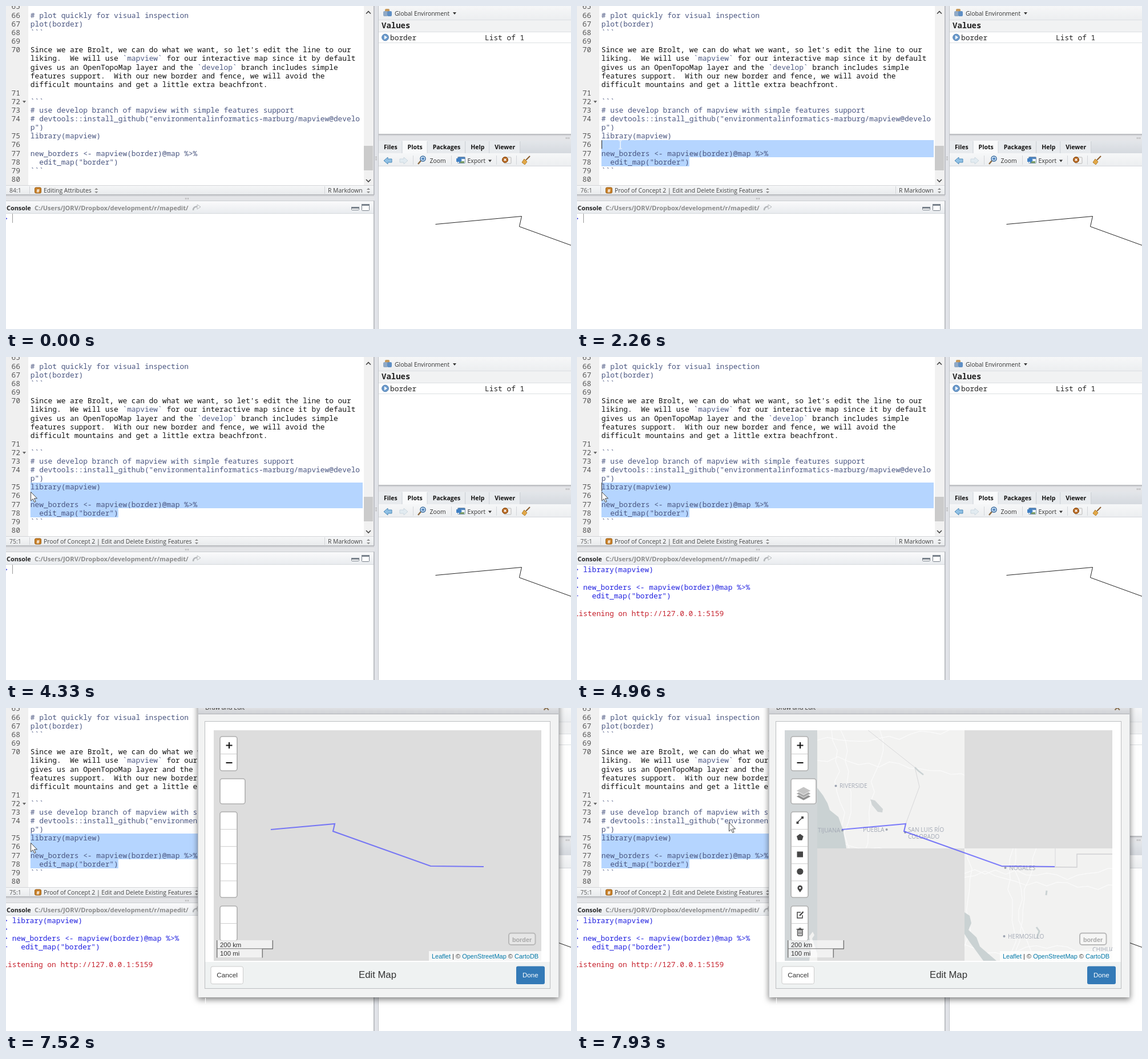
An HTML page with a canvas that plays this animation: 990x566 px, repeating every 8000 ms.

```html
<!DOCTYPE html>
<html lang="en">
<head>
<meta charset="utf-8">
<title>Editing a map from the console</title>
<style>
html, body { margin: 0; width: 100%; height: 100%; overflow: hidden; background: #fff; }
canvas { display: block; width: 990px; height: 566px; }
</style>
</head>
<body>
<canvas id="stage" width="990" height="566"></canvas>
<script>
const c = document.getElementById('stage').getContext('2d');
const LOOP = 8000, ADV = 7.698, LEFT = 42.8, ROW = 15.1;
const MONO = '12.83px "Noto Sans Mono", monospace';
const sans = s => s + 'px "Open Sans", sans-serif';
const arial = s => s + 'px "Liberation Sans", Arial, sans-serif';
const UI = sans(10.4), BOLD = 'bold ' + sans(10.5);
const INK = '#4a5680', GREY = '#555';

// Lines without a number continue the one above.
const CODE = `66|# plot quickly for visual inspection
67|plot(border)
68|\`\`\`
69|
70|Since we are Brolt, we can do what we want, so let's edit the line to our
|liking.  We will use \`mapview\` for our interactive map since it by default
|gives us an OpenTopoMap layer and the \`develop\` branch includes simple
|features support.  With our new border and fence, we will avoid the
|difficult mountains and get a little extra beachfront.
71|
72|\`\`\`
73|# use develop branch of mapview with simple features support
74|# devtools::install_github("environmentalinformatics-marburg/mapview@develo
|p")
75|library(mapview)
76|
77|new_borders <- mapview(border)@map %>%
78|  edit_map("border")
79|\`\`\`
80|`.split('\n').map(s => s.split('|'));
const PROSE_FROM = 4, PROSE_TO = 8, LAST = 17;

const DRAG_START = 2030, DRAG_END = 2780, OPEN = 5120, MAP = 7520, TILES = 7610;
// Pointer key points: time, x, y
const PATH = [
  [0, 1010, 580], [230, 822, 522], [480, 268, 306], [1310, 194, 276], [DRAG_START, 194, 275],
  [2260, 76, 243], [DRAG_END, 46, 234], [3650, 46, 234], [3790, 43, 236], [TILES, 43, 236], [7930, 266, 200]
];

const clamp = (v, a, b) => Math.min(b, Math.max(a, v));
const rowTop = r => 8.7 + ROW * r;

function pointerAt(t) {
  const i = PATH.findLastIndex(p => p[0] <= t);
  const a = PATH[i], b = PATH[i + 1] || a;
  const u = clamp((t - a[0]) / (b[0] - a[0] || 1), 0, 1), k = u * u * (3 - 2 * u);
  return [a[1] + (b[1] - a[1]) * k, a[2] + (b[2] - a[2]) * k];
}
// The selection head follows the pointer while dragging.
function headAt(t) {
  if (t < DRAG_START) return null;
  const [x, y] = pointerAt(Math.min(t, DRAG_END));
  const row = Math.floor((y - rowTop(0)) / ROW);
  return { row, col: clamp(Math.round((x - LEFT) / ADV), 0, CODE[row][1].length) };
}
function seeded(s) {
  return () => (s = (s * 16807) % 2147483647) / 2147483647;
}

function rect(x, y, w, h, fill) { c.fillStyle = fill; c.fillRect(x, y, w, h); }
function grad(x, y, w, h, a, b) {
  const g = c.createLinearGradient(0, y, 0, y + h);
  g.addColorStop(0, a);
  g.addColorStop(1, b);
  rect(x, y, w, h, g);
}
function text(s, x, y, font, color, align = 'left') {
  c.font = font;
  c.fillStyle = color;
  c.textAlign = align;
  c.fillText(s, x, y);
  return c.measureText(s).width;
}
function paint(fill, stroke, w = 1) {
  if (fill) { c.fillStyle = fill; c.fill(); }
  if (stroke) { c.strokeStyle = stroke; c.lineWidth = w; c.stroke(); }
}
function trace(pts) {
  c.beginPath();
  pts.forEach(p => c.lineTo(p[0], p[1]));
}
function poly(pts, fill, stroke, w) { trace(pts); c.closePath(); paint(fill, stroke, w); }
function line(pts, color, w) { trace(pts); paint(null, color, w); }
function box(x, y, w, h, r, fill, stroke, lw) {
  c.beginPath();
  c.roundRect(x, y, w, h, r);
  paint(fill, stroke, lw);
}
function disc(x, y, r, fill, stroke, w) {
  c.beginPath();
  c.arc(x, y, r, 0, 7);
  paint(fill, stroke, w);
}
function cross(x, y, r, color, w) {
  line([[x - r, y - r], [x + r, y + r]], color, w);
  line([[x + r, y - r], [x - r, y + r]], color, w);
}
function tri(x, y, s, h, color) { poly([[x - s, y], [x + s, y], [x, y + h]], color); }
function updown(x) {
  tri(x, 322, 3, -3, '#8a8a8a');
  tri(x, 325, 3, 3, '#8a8a8a');
}
function grip(x, y, across) {
  for (let i = 0; i < 3; i++) {
    if (across) rect(x + i * 2.5, y, 1, 3, '#aaa');
    else rect(x, y + i * 2.5, 3, 1, '#aaa');
  }
}
function clipped(x, y, w, h, draw) {
  c.save();
  c.beginPath();
  c.rect(x, y, w, h);
  c.clip();
  draw();
  c.restore();
}

function selection({ row, col }) {
  for (let r = row; r <= LAST; r++) {
    const x = r === row ? LEFT + col * ADV : LEFT;
    const end = r === LAST ? LEFT + CODE[r][1].length * ADV : 625;
    const y = Math.round(rowTop(r));
    rect(x, y, end - x, Math.round(rowTop(r + 1)) - y, '#b5d5ff');
  }
}

function editor(t) {
  const head = headAt(t);
  rect(0, 0, 39, 314, '#f0f0f0');
  if (head) selection(head);
  text('65', 25, 5, MONO, GREY, 'right');
  CODE.forEach(([num, s], r) => {
    const y = rowTop(r) + 12.2, prose = r >= PROSE_FROM && r <= PROSE_TO;
    text(num, 25, y, MONO, GREY, 'right');
    let x = LEFT;
    for (const part of prose ? s.split(/(`[^`]*`)/) : [s]) {
      text(part, x, y, MONO, prose && part[0] !== '`' ? '#111' : INK);
      x += part.length * ADV;
    }
  });
  tri(32, 166, 3, 4, '#666');
  const blinkOn = t < DRAG_END || Math.floor((t - DRAG_END) / 512) % 2 === 0;
  if (head && blinkOn && t < OPEN) rect(Math.round(LEFT + head.col * ADV), rowTop(head.row), 1, ROW, '#222');

  rect(627, 0, 17, 314, '#f1f1f1');
  rect(627, 245, 16, 43, '#cbcbcb');
  line([[631, 13.5], [635, 9.5], [639, 13.5]], '#444', 1.6);
  line([[631, 304], [635, 308], [639, 304]], '#444', 1.6);

  grad(0, 314, 645, 16, '#f6f7f8', '#e9ebed');
  rect(0, 314, 645, 1, '#d3d5d8');
  for (const x of [41, 558]) rect(x, 316, 1, 13, '#d0d2d5');
  text(head ? CODE[head.row][0] + ':' + (head.col + 1) : '84:1', 6, 327, UI, GREY);
  box(50.5, 318, 11, 10, 2, '#c9822c', '#9c6118');
  text('#', 56, 326.5, 'bold ' + sans(8), '#fff', 'center');
  const title = head ? 'Proof of Concept 2 | Edit and Delete Existing Features' : 'Editing Attributes';
  updown(66 + text(title, 66, 327, UI, '#444') + 8.5);
  text('R Markdown', 564, 327, UI, '#444');
  updown(635);
}

function consolePane(t) {
  rect(0, 330, 652, 11, '#e4e5e8');
  grad(0, 330, 645, 4, '#b0b2b6', '#e4e5e8');
  grip(314, 336, true);
  grad(0, 341, 645, 22, '#fbfbfc', '#e9ecef');
  rect(0, 341, 645, 1, '#c9ccd0');
  rect(0, 363, 645, 1, '#d5d8dc');
  text('Console', 1, 357.5, 'bold ' + sans(10.9), '#222');
  text('C:/Users/JORV/Dropbox/development/r/mapedit/', 50, 357.5, 'bold ' + sans(11), '#8b8b8b');
  c.beginPath();
  c.moveTo(328, 358);
  c.quadraticCurveTo(328, 351.5, 335, 351.5);
  paint(null, '#b4b7ba', 2.5);
  poly([[335, 348], [341, 352], [335, 356]], '#f4f5f6', '#b4b7ba');
  for (const [x, y, h] of [[605, 352, 6], [623, 347, 12]]) {
    box(x + .5, y + .5, 13, h - 1, 1, '#fff', '#77808a');
    rect(x, y, 14, 3, '#77808a');
  }

  const print = (s, row, color = '#2222e0') => text(s, 10.8 - 2 * ADV, 377 + 15.4 * row, MONO, color);
  print(t < 4640 ? '>' : '> library(mapview)', 0);
  if (t < 4640) rect(11, 364, 1, 16, '#999');
  if (t >= 4800) ['>', '> new_borders <- mapview(border)@map %>%', '+   edit_map("border")'].forEach((s, i) => print(s, i + 1));
  if (t >= 4960) print('Listening on http://127.0.0.1:5159', 5, '#c5202c');
}

function arrow(x, y, k, fill, edge) {
  const half = [[-7, 0], [0, -6], [0, -3], [7, -3]];
  const pts = half.concat(half.map(p => [p[0], -p[1]]).reverse());
  poly(pts.map(p => [x + p[0] * k, y + p[1]]), fill, edge);
}

function plotToolbar() {
  grad(653, 258, 337, 22, '#f6f7f8', '#eceef0');
  rect(653, 280, 337, 1, '#d5d8dc');
  arrow(669, 271, 1, '#8fc0e4', '#4a88b8');
  arrow(697, 271, -1, '#e2ebf1', '#ccd8e0');
  for (const x of [713, 780, 859, 894]) rect(x, 262, 1, 16, '#d3d6da');
  line([[727, 271], [722, 277]], '#8a6a42', 2.5);
  disc(730.5, 267.5, 4.5, '#cfe3f5', '#3d6d9f', 1.5);
  rect(728, 267, 5, 1.4, '#2f6cb0');
  rect(730, 265, 1.4, 5, '#2f6cb0');
  text('Zoom', 742.5, 275, UI, '#333');
  box(791.5, 264.5, 13, 11, 1, '#eef4fa', '#7f95ab');
  rect(792, 265, 12, 3, '#4d82bd');
  rect(794, 272, 9, 3, '#7a9c64');
  arrow(794, 270, -.7, '#3f80c4');
  text('Export', 808.5, 275, UI, '#333');
  tri(848, 269.5, 3, 4, '#333');
  box(873, 265, 12, 11, 1, '#f2f2f2', '#b8b8b8');
  disc(874.5, 269.5, 5, '#b5651d', '#8a4a10');
  cross(874.5, 269.5, 2, '#fff', 1.5);
  line([[918, 263], [911, 270]], '#8a5a2b', 2);
  poly([[908, 268], [913, 273], [909, 278], [904, 274]], '#e2a848', '#b47f2a');
}

function rightPanes() {
  rect(645, 0, 8, 566, '#e1e3e8');
  for (const [y, h] of [[0, 331], [341, 225]]) {
    rect(644, y, 1, h, '#b2b5ba');
    rect(645, y, 1, h, '#c6c8cd');
  }
  rect(652, 0, 1, 566, '#c3c6cb');
  grip(647, 264, false);

  grad(653, 0, 337, 24, '#f6f7f8', '#eceef0');
  rect(653, 25, 337, 20, '#f1f2f3');
  for (const y of [24, 45, 64]) rect(653, y, 337, 1, '#dcdfe2');
  box(664, 5, 8, 8, 2, '#c7995a');
  box(661, 9, 8, 9, 2, '#8fa9c6');
  box(668, 9, 8, 9, 2, '#5f8fc4');
  text('Global Environment', 681, 16.8, UI, '#333');
  tri(786, 11, 3, 4, '#333');
  text('Values', 658, 39, 'bold 14px "Noto Sans Mono", monospace', '#222');
  disc(664.5, 55, 5.8, '#6c9bcd', '#4a79ab');
  poly([[663, 51.5], [668, 55], [663, 58.5]], '#fff');
  text('border', 673, 59.5, MONO, '#222');
  text('List of 1', 839, 59.5, MONO, '#222');

  rect(653, 224, 337, 12, '#e4e5e8');
  grad(653, 224, 337, 4, '#b0b2b6', '#e4e5e8');
  grip(981, 230, true);
  grad(653, 236, 337, 22, '#e3e6ea', '#d5d9df');
  let x = 662;
  for (const name of ['Files', 'Plots', 'Packages', 'Help', 'Viewer']) {
    c.font = BOLD;
    const w = c.measureText(name).width;
    rect(x - 9, 236, w + 18, 22, name === 'Plots' ? '#f8f9fa' : '#e8ebee');
    rect(x + w + 8, 237, 1, 21, '#c6cad0');
    text(name, x, 251, BOLD, '#111');
    x += w + 18;
  }
  plotToolbar();
  line([[752.5, 382.5], [903.5, 368.5], [899.5, 386.5], [990.5, 419.5]], '#222');
}

// Gently wandering roads across one tile.
function roads(x, y, w, h, seed) {
  const rnd = seeded(seed);
  for (let i = 0; i < 7; i++) {
    const flat = i % 2, pts = [];
    let off = rnd() * (flat ? h : w);
    for (let d = 0; d <= 270; d += 18) {
      pts.push(flat ? [x + d, y + off] : [x + off, y + d]);
      off += (rnd() - .5) * 18;
    }
    line(pts, '#fbfbfb', 1.2);
  }
}

function tiles(alpha) {
  const land = '#f2f2f1', sea = '#cad2d3', edge = '#d8d8da';
  c.globalAlpha = alpha;
  rect(364, 39, 57, 404, '#d1d6d8');
  poly([[407, 443], [410, 420], [407, 400], [413, 392], [416, 398], [412, 404], [421, 430], [421, 443]], land);

  clipped(421, 39, 258, 207, () => {
    rect(421, 39, 258, 207, land);
    roads(421, 39, 258, 207, 11);
    poly([[421, 140], [431, 153], [439, 167], [443, 179], [458, 191], [466, 213], [472, 246], [421, 246]], sea);
    poly([[514, 160], [522, 162], [536, 177], [535, 183], [527, 182], [517, 170]], '#d0d5d6');
    line([[510, 39], [592, 104], [600, 138], [576, 203], [573, 216], [679, 254]], edge);
    line([[592, 104], [598, 110], [607, 117]], sea, 2.5);
  });
  clipped(679, 246, 259, 197, () => {
    rect(679, 246, 259, 197, land);
    roads(679, 246, 259, 197, 29);
    poly([[679, 358], [688, 364], [691, 377], [686, 389], [700, 402], [706, 418], [735, 443], [712, 443], [688, 410], [679, 396]], sea);
    line([[744, 278], [876, 279], [876, 256], [938, 256]], '#d0d0d3', 1.4);
    line([[838, 246], [838, 279]], edge);
    line([[823, 320], [822, 328]], sea, 3);
    line([[805, 384], [810, 391], [806, 404]], sea, 3);
  });

  // Name, x, baseline, side of the dot
  for (const [name, x, y, side] of [
    ['RIVERSIDE', 460, 140, -1], ['TIJUANA', 422, 218, 1], ['PUEBLA', 501, 216.5, 1], ['SAN LUIS RÍO', 580, 216.5, 0],
    ['COLORADO', 580, 228.5, 0], ['NOGALES', 757, 283.5, -1], ['HERMOSILLO', 755, 403.5, -1], ['CHIHUAHUA', 903, 426.5, 0]
  ]) {
    const w = text(name, x, y, sans(10.2), '#a3a9b5');
    if (side) disc(side < 0 ? x - 6.5 : x + w + 4, y - 3.5, 2, '#9aa1af');
  }
  disc(575, 218, 2, '#9aa1af');
}

function mapIcons() {
  const k = '#464646', x = 390.8;
  ['#8f8f8f', '#a9a9a9', '#c4c4c4'].forEach((fill, i) => {
    const y = 155 - i * 5;
    poly([[384, y], [397, y - 7], [410, y], [397, y + 7]], fill, '#fff', .8);
  });
  line([[386, 200.5], [395, 192]], k, 1.6);
  rect(384.5, 199, 4, 4, k);
  rect(393, 190, 4, 4, k);
  poly([0, 1, 2, 3, 4].map(i => [x + 6.2 * Math.sin(i * 1.2566), 226.7 - 6.2 * Math.cos(i * 1.2566)]), k);
  rect(385.5, 251.5, 10.5, 10, k);
  disc(x, 286.5, 5.6, k);
  tri(x, 317, 4.2, 6, k);
  disc(x, 315.2, 4.4, k);
  disc(x, 315.2, 1.7, '#fff');
  line([[392, 358], [386, 358], [386, 368], [395, 368], [395, 363]], k, 1.5);
  line([[390, 364], [396.5, 357]], k, 2.4);
  box(386.5, 389, 8.5, 10, 1, null, k, 1.4);
  rect(384.5, 387, 12.5, 1.4, k);
  rect(388.5, 385.3, 4.5, 1.4, k);
  for (let i = -1; i < 2; i++) rect(x - .5 + i * 2.1, 391, 1, 6, k);
}

function buttonGroup(y, h, n, w = 32) {
  box(375, y + 1, w - 2, h - 2, 4, '#fff', '#b0b0b0', 1.6);
  for (let i = 1; i < n; i++) rect(376, y + 1 + i * 30.1, w - 4, 1, '#ccc');
}
function scaleBar(label, y, w, closed) {
  rect(369, y, w, 15, 'rgba(255,255,255,.6)');
  const x = 369.7, end = 369 + w - .7;
  line([[x, y], [x, y + 15.5]], '#777', 1.5);
  line([[end, y], [end, y + 15.5]], '#777', 1.5);
  if (closed) line([[x, y + 15], [end, y + 15]], '#777', 1.5);
  text(label, 375, y + 12.2, arial(11.4), '#333');
}

function mapPage(t) {
  rect(364, 39, 574, 404, '#ddd');
  if (t >= TILES) clipped(364, 39, 574, 404, () => tiles(clamp((t - TILES) / 250, 0, 1)));
  line([[464, 213], [576, 203], [573, 216], [744, 277], [837, 278]], 'rgba(70,70,255,.68)', 2.1);

  buttonGroup(49, 62, 2);
  rect(385.5, 64.5, 11, 2, '#111');
  rect(390, 60, 2, 11, '#111');
  rect(385.5, 95, 11, 2, '#111');
  buttonGroup(123, 46, 1, 46);
  buttonGroup(181, 152, 5);
  buttonGroup(346, 63, 2);
  if (t >= TILES) mapIcons();
  scaleBar('200 km', 407, 99, true);
  scaleBar('100 mi', 422, 81, false);

  box(881, 394.5, 46.5, 20.5, 4, 'rgba(255,255,255,.25)', '#b9b9b9', 2);
  text('border', 904, 409.5, 'bold ' + arial(10.8), '#a8a8a8', 'center');
  rect(741, 426, 197, 17, 'rgba(255,255,255,.75)');
  let x = 746;
  for (const part of ['Leaflet', ' | © ', 'OpenStreetMap', ' © ', 'CartoDB'])
    x += text(part, x, 438.5, arial(11), part[0] === ' ' ? '#333' : '#0078a8');

  rect(349, 445, 604, 46, '#eff2f2');
  box(359, 453, 56.5, 30.5, 3, '#fff', '#ccc');
  text('Cancel', 387.5, 472.2, arial(11.8), '#333', 'center');
  text('Edit Map', 651, 473, arial(16.7), '#333', 'center');
  box(894, 452.5, 50, 31.5, 3, '#337ab7');
  text('Done', 918.8, 472.2, arial(11.6), '#fff', 'center');
}

function dialog(t) {
  c.save();
  c.shadowColor = 'rgba(0,0,0,.5)';
  c.shadowBlur = 10;
  c.shadowOffsetY = 4;
  rect(336, -20, 633, 527, '#f2f3f3');
  c.restore();
  grad(336, 0, 633, 10, '#dfe0e3', '#cfd1d5');
  rect(336, 10, 633, 1, '#b0b2b6');
  for (const x of [336, 968]) rect(x, 0, 1, 507, '#c4c6c9');
  text('Draw and Edit', 349, 3, sans(10.6), '#333');
  cross(946.7, -.7, 4.2, '#8a7355', 2.2);
  rect(348, 23, 606, 469, '#bcbec0');
  rect(349, 24, 604, 467, '#fff');
  rect(349, 508, 1, 10, '#fff');
  if (t >= MAP) mapPage(t);
}

function pointer(t) {
  const [x, y] = pointerAt(t);
  if (t >= 3650 || x > 645) {
    const tip = [[0, 0], [0, 15.5], [3.6, 12.2], [6.2, 18], [8.6, 17], [6, 11.3], [11, 11.3]];
    poly(tip.map(p => [x + .5 + p[0], y + .5 + p[1]]), '#fff', '#444');
  } else {
    rect(x - .7, y - 7, 1.4, 14, '#f4f8fc');
    for (const end of [-7, 7]) rect(x - 3, y + end - .5, 6, 1, '#f4f8fc');
  }
}

function frame(now) {
  const t = now % LOOP;
  rect(0, 0, 990, 566, '#fff');
  editor(t);
  consolePane(t);
  rightPanes();
  if (t >= OPEN) dialog(t);
  pointer(t);
  requestAnimationFrame(frame);
}
requestAnimationFrame(frame);
</script>
</body>
</html>
```
